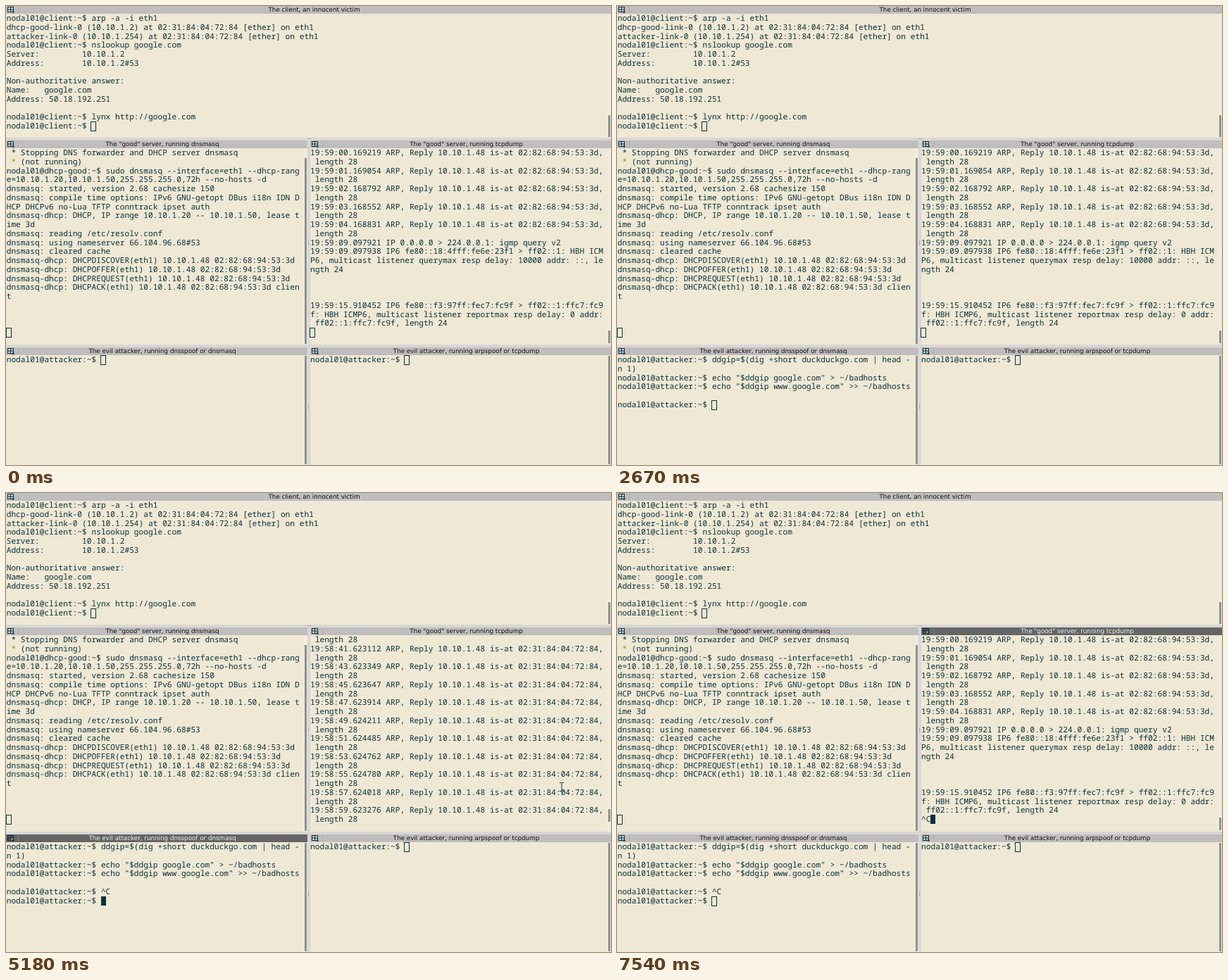
Write an HTML page with a canvas that moves like this. It is 859x652 px and loops after 8 s.

```html
<!DOCTYPE html>
<html lang="en">
<head>
<meta charset="utf-8">
<title>Four terminals</title>
<style>
html, body { margin: 0; width: 100%; height: 100%; overflow: hidden; background: #eee8d5; }
canvas { display: block; }
</style>
</head>
<body>
<canvas id="stage" width="859" height="652"></canvas>
<script>
const ctx = document.getElementById('stage').getContext('2d');
const LOOP = 8000, COL = 6.71, ROW = 12.75;
const INK = '#0b303a', PAPER = '#eee8d5', GREY = '#8f8f8f';
const USER = 'nodal01';
const prompt = host => `${USER}@${host}:~$ `;

const clientLines = [
  prompt('client') + 'arp -a -i eth1',
  'dhcp-good-link-0 (10.10.1.2) at 02:31:84:04:72:84 [ether] on eth1',
  'attacker-link-0 (10.10.1.254) at 02:31:84:04:72:84 [ether] on eth1',
  prompt('client') + 'nslookup google.com',
  'Server:         10.10.1.2',
  'Address:        10.10.1.2#53',
  '',
  'Non-authoritative answer:',
  'Name:   google.com',
  'Address: 50.18.192.251',
  '',
  prompt('client') + 'lynx http://google.com',
  prompt('client')
];

const dhcpLines = [
  ' * Stopping DNS forwarder and DHCP server dnsmasq',
  ' * (not running)',
  prompt('dhcp-good') + 'sudo dnsmasq --interface=eth1 --dhcp-rang',
  'e=10.10.1.20,10.10.1.50,255.255.255.0,72h --no-hosts -d',
  'dnsmasq: started, version 2.68 cachesize 150',
  'dnsmasq: compile time options: IPv6 GNU-getopt DBus i18n IDN D',
  'HCP DHCPv6 no-Lua TFTP conntrack ipset auth',
  'dnsmasq-dhcp: DHCP, IP range 10.10.1.20 -- 10.10.1.50, lease t',
  'ime 3d',
  'dnsmasq: reading /etc/resolv.conf',
  'dnsmasq: using nameserver 66.104.96.68#53',
  'dnsmasq: cleared cache',
  ...['DISCOVER', 'OFFER', 'REQUEST', 'ACK'].map(type =>
    `dnsmasq-dhcp: DHCP${type}(eth1) 10.10.1.48 02:82:68:94:53:3d` + (type === 'ACK' ? ' clien' : '')),
  't'
];
dhcpLines[2] = dhcpLines[2].replace('rang', 'rang').slice(0, 62);

const arpReply = (time, mac) => [`19:${time} ARP, Reply 10.10.1.48 is-at ${mac},`, ' length 28'];

const latestLines = [
  ...['00.169219', '01.169054', '02.168792', '03.168552', '04.168831']
    .flatMap(s => arpReply('59:' + s, '02:82:68:94:53:3d')),
  '19:59:09.097921 IP 0.0.0.0 > 224.0.0.1: igmp query v2',
  '19:59:09.097938 IP6 fe80::18:4fff:fe6e:23f1 > ff02::1: HBH ICM',
  'P6, multicast listener querymax resp delay: 10000 addr: ::, le',
  'ngth 24',
  '', '', '',
  '19:59:15.910452 IP6 fe80::f3:97ff:fec7:fc9f > ff02::1:ffc7:fc9',
  'f: HBH ICMP6, multicast listener reportmax resp delay: 0 addr:',
  ' ff02::1:ffc7:fc9f, length 24'
];

const olderLines = [
  ' length 28',
  ...['41.623112', '43.623349', '45.623647', '47.623914', '49.624211',
      '51.624485', '53.624762', '55.624780', '57.624018', '59.623276']
    .flatMap(s => arpReply('58:' + s, '02:31:84:04:72:84'))
];

const attackLines = [
  prompt('attacker') + 'ddgip=$(dig +short duckduckgo.com | head -',
  'n 1)',
  prompt('attacker') + 'echo "$ddgip google.com" > ~/badhosts',
  prompt('attacker') + 'echo "$ddgip www.google.com" >> ~/badhosts',
  '',
  prompt('attacker')
];

// Mouse pointer: [time, x, y]; no position means hidden.
const pointerPath = [
  [1920, 4, 498], [1960],
  [3570, 26, 410], [3610, 150, 413], [3650, 360, 418], [3690, 580, 424],
  [3730, 745, 428], [3770, 855, 427], [3810, 823, 424],
  [4010, 803, 424], [4050, 782, 424], [4480, 785, 420], [4520, 789, 417],
  [5550, 786, 420], [5590, 780, 425], [5640, 774, 430], [5680, 769, 433],
  [5730, 766, 435], [5770, 765, 436], [6290]
];

const between = (t, from, to) => t >= from && t < to;

function box(x, y, w, h, color) {
  ctx.fillStyle = color;
  ctx.fillRect(x, y, w, h);
}

function drawIcon(x, y, active) {
  box(x + 2, y + 1, 9, 8, INK);
  const tiles = active ? ['#a33b32', '#3b4fa0', '#3b4fa0', '#c9a83a'] : Array(4).fill('#d2d0d0');
  tiles.forEach((color, i) => box(x + 3 + (i % 2) * 4, y + 2 + (i >> 1) * 3.5, 3, 2.5, color));
  box(x + 8, y + 8, 4, 1, INK);
  box(x + 9.5, y + 6.5, 1, 4, INK);
}

function drawTitle(x, y, w, text, active) {
  box(x, y, w, 11, active ? '#666565' : '#bfbdbd');
  drawIcon(x, y, active);
  box(x + 17, y + 1, 1, 9, active ? '#858484' : '#aaa8a8');
  ctx.font = '8.75px "DejaVu Sans", sans-serif';
  ctx.textAlign = 'center';
  ctx.fillStyle = active ? '#eeeeee' : '#111111';
  ctx.fillText(text, x + w / 2 + 8, y + 8.3);
}

function drawLines(x, y, lines) {
  ctx.font = '11.18px "Noto Sans Mono", "DejaVu Sans Mono", monospace';
  ctx.textAlign = 'left';
  ctx.fillStyle = INK;
  lines.forEach((line, row) => [...line].forEach((char, col) => {
    if (char !== ' ') ctx.fillText(char, x + col * COL, y + row * ROW + 10);
  }));
}

function drawCursor(x, y, [col, row, style]) {
  const left = Math.round(x + col * COL), top = Math.round(y + row * ROW);
  if (style === 'solid') box(left, top, 7, 13, INK);
  if (style === 'hollow') {
    ctx.strokeStyle = INK;
    ctx.lineWidth = 1;
    ctx.strokeRect(left - .5, top + .5, 7, 13);
  }
}

function drawPane({ x, y, w, h, title, active, lines, cursor, thumb }) {
  box(x, y, w, h, PAPER);
  drawTitle(x, y, w, title, active);
  box(x + w - 5, y + 11, 5, h - 11, '#f0ece0');
  box(x + w - 4, thumb[0], 3, thumb[1] - thumb[0], GREY);
  const textX = x ? x : .7, textY = y + 11.2;
  drawLines(textX, textY, lines);
  if (cursor) drawCursor(textX, textY, cursor);
}

function drawPointer(t) {
  const [, x, y] = pointerPath.findLast(step => step[0] <= t) || [];
  if (x === undefined) return;
  box(x - .5, y - 5, 1, 11, INK);
  for (const edge of [-6, 6]) {
    box(x - 3, y + edge, 2.5, 1, INK);
    box(x + .5, y + edge, 2.5, 1, INK);
  }
}

function attackerState(t) {
  const active = between(t, 900, 2670) || between(t, 3960, 5640);
  const blinkedOff = between(t, 1750, 2340);
  const style = !active ? 'hollow' : blinkedOff ? 'none' : 'solid';
  if (t < 1360) return { active, lines: [prompt('attacker')], cursor: [20, 0, style] };
  if (t < 1400) return { active, lines: attackLines.slice(0, 3), cursor: [57, 2, style] };
  if (t < 5180) return { active, lines: attackLines, cursor: [20, 5, style] };
  const lines = [...attackLines.slice(0, 5), prompt('attacker') + '^C', prompt('attacker')];
  return { active, lines, cursor: [20, 6, style] };
}

function tcpdumpState(t) {
  const active = t >= 5640;
  if (between(t, 3960, 6330)) return { active, lines: olderLines, thumb: [449, 467] };
  const typed = t >= 7540 ? '^C' : t >= 6880 ? '^' : '';
  const style = !active ? 'hollow' : typed === '^' ? 'none' : 'solid';
  return { active, lines: [...latestLines, typed], cursor: [typed.length, 20, style], thumb: [461, 479] };
}

function draw(t) {
  box(0, 0, 859, 652, '#d9d7d5');
  drawPane({ x: 0, y: 0, w: 859, h: 187, title: 'The client, an innocent victim',
    lines: clientLines, cursor: [18, 12, 'hollow'], thumb: [155, 186] });
  drawPane({ x: 0, y: 191, w: 428, h: 290, title: 'The "good" server, running dnsmasq',
    lines: dhcpLines, cursor: [0, 20, 'hollow'], thumb: [216, 480] });
  box(7, 215, 7, 12, PAPER);
  ctx.fillStyle = '#b58900';
  ctx.fillText('*', .7 + COL, 202.2 + ROW + 10);
  drawPane({ x: 432, y: 191, w: 427, h: 290, title: 'The "good" server, running tcpdump',
    ...tcpdumpState(t) });
  drawPane({ x: 0, y: 485, w: 428, h: 167, title: 'The evil attacker, running dnsspoof or dnsmasq',
    thumb: [497, 651], ...attackerState(t) });
  drawPane({ x: 432, y: 485, w: 427, h: 167, title: 'The evil attacker, running arpspoof or tcpdump',
    lines: [prompt('attacker')], cursor: [20, 0, 'hollow'], thumb: [497, 651] });
  for (const [x, y, dx, dy] of [[428, 188, 2, 0], [429, 334, 0, 2], [429, 567, 0, 2]])
    for (let i = 0; i < 3; i++) box(x + i * dx, y + i * dy, 1, 1, '#8a8886');
  drawPointer(t);
}

ctx.textRendering = 'geometricPrecision';
const start = performance.now();
(function tick() {
  draw((performance.now() - start) % LOOP);
  requestAnimationFrame(tick);
})();
</script>
</body>
</html>
```
